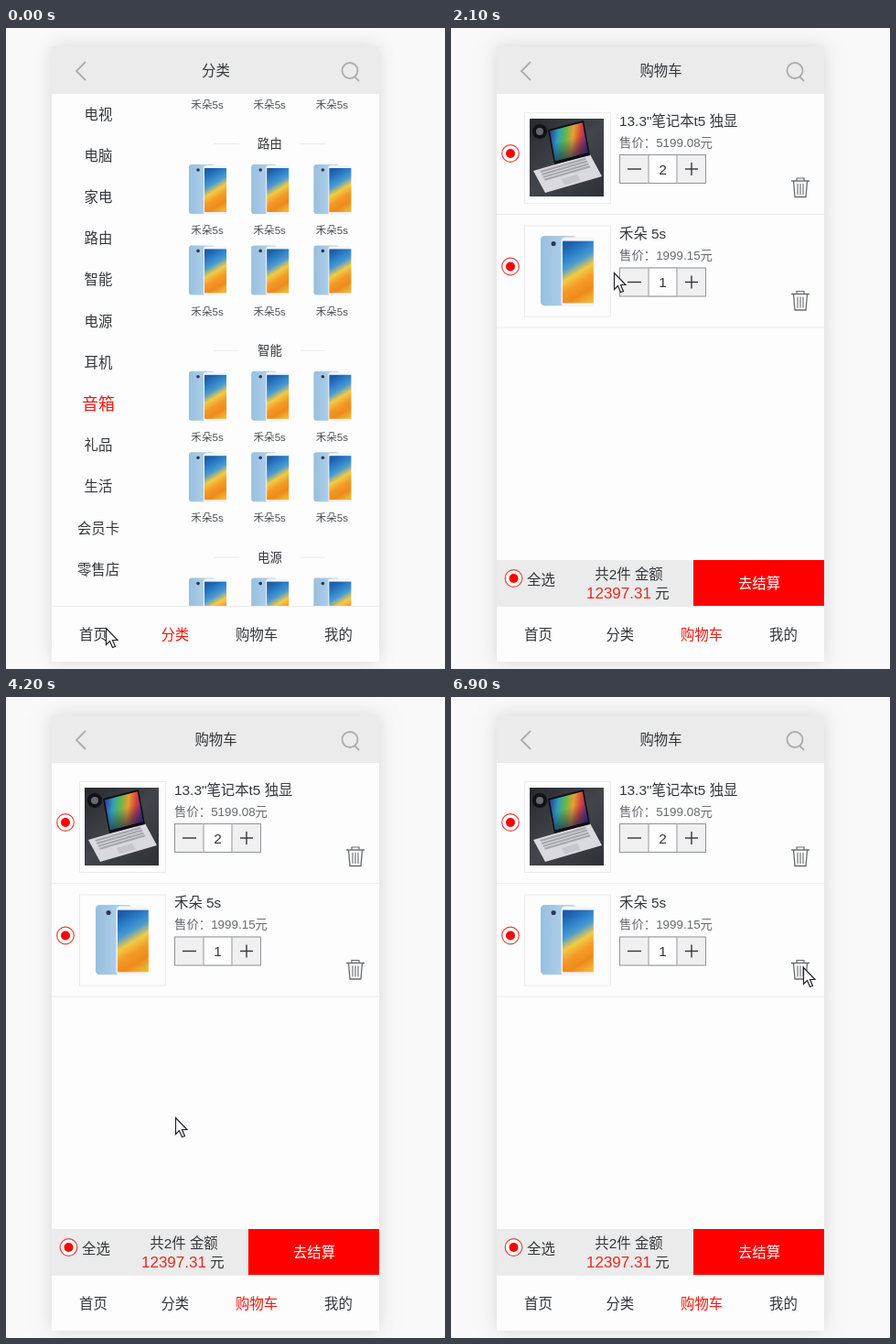
These frames come from a looping animation (480x700 px, 7000 ms). An HTML page with a canvas:

```html
<!DOCTYPE html>
<html lang="zh-CN">
<head>
<meta charset="utf-8">
<style>
html, body { margin: 0; height: 100%; overflow: hidden; }
canvas { display: block; }
</style>
</head>
<body>
<canvas id="stage" width="480" height="700"></canvas>
<script>
const c = document.getElementById('stage').getContext('2d');
const LOOP = 7000, STEP = 100, CART_OPENS = 1100;
const INK = '#33363c', GRAY = '#666a70', RED = '#f01810', BAR = '#ebebeb', PALE = '#ececec', PAPER = '#fdfdfd';
const LEFT = 50, RIGHT = 408, WIDTH = RIGHT - LEFT;
const PRODUCT = '禾朵';
const ARROW = new Path2D('M0 0V18L4 14L7 21L10 20L7 13H12.5Z');

// Places the pointer comes to: time, x, y
const STOPS = [
  [0, 109, 655], [1000, 278, 664], [1300, 278, 664], [2100, 178, 267],
  [3100, 71, 605], [4900, 243, 385], [6100, 385, 295], [LOOP, 385, 295]
];

function rect(x, y, w, h, fill, stroke) {
  c.fillStyle = fill;
  c.fillRect(x, y, w, h);
  if (stroke) {
    c.strokeStyle = stroke;
    c.lineWidth = 1;
    c.strokeRect(x + 0.5, y + 0.5, w - 1, h - 1);
  }
}

function card(x, y, w, h, fill) {
  c.beginPath();
  c.roundRect(x, y, w, h, 3);
  c.fillStyle = fill;
  c.fill();
}

function line(color, width, ...points) {
  c.beginPath();
  points.forEach(([x, y]) => c.lineTo(x, y));
  c.strokeStyle = color;
  c.lineWidth = width;
  c.stroke();
}

const rule = (x1, x2, y, color = PALE, width = 1) => line(color, width, [x1, y], [x2, y]);

function circle(x, y, r, fill, stroke, width = 1) {
  c.beginPath();
  c.arc(x, y, r, 0, Math.PI * 2);
  if (fill) { c.fillStyle = fill; c.fill(); }
  if (stroke) { c.strokeStyle = stroke; c.lineWidth = width; c.stroke(); }
}

function text(str, x, y, size = 15.4, color = INK, align = 'center') {
  c.font = `${size}px "Liberation Sans", "Noto Sans CJK SC", "Noto Sans CJK", sans-serif`;
  c.textAlign = align;
  c.fillStyle = color;
  c.fillText(str, x, y + size * 0.37);
}

function gradient(x1, y1, x2, y2, ...colors) {
  const g = c.createLinearGradient(x1, y1, x2, y2);
  colors.forEach((color, i) => g.addColorStop(i / (colors.length - 1), color));
  return g;
}

// Runs paint with its own coordinates; the matrix goes to c.transform
function within(matrix, paint) {
  c.save();
  c.transform(...matrix);
  paint();
  c.restore();
}

function phone(x, y, scale = 1) {
  within([scale, 0, 0, scale, x, y], () => {
    card(0, 0, 28, 54, gradient(0, 0, 28, 0, '#98bfdf', '#b9d7ee'));
    circle(10, 6, 1.8, '#2c3850');
    card(16, 1, 25.5, 54, '#f3f5f8');
    rect(17, 4, 24, 48, gradient(18, 8, 42, 48,
      '#1c5ca8', '#2a7cc6', '#4a9bd0', '#f2cb45', '#f39a26', '#ee8a1c', '#f0b535'));
  });
}

function laptop() {
  rect(86, 99, 81, 85, gradient(86, 99, 167, 184, '#26282c', '#42454b', '#2d3035'));
  circle(97, 113, 8, '#101216');
  circle(97, 113, 4, '#666a72');
  within([62, -18, 13, 24, 90, 156], () => {
    rect(0, 0, 1, 1, '#d9d9de');
    for (let row = 0; row < 4; row++) rect(0.1, 0.08 + row * 0.12, 0.8, 0.08, '#a6a7ae');
    rect(0.36, 0.64, 0.28, 0.28, '#c6c6cd');
  });
  within([39, -10, 7, 38, 106, 111], () => {
    rect(0, 0, 1, 1, '#0d0f14');
    rect(0.04, 0.05, 0.92, 0.86, gradient(0, 0.3, 1, 0.6, '#2c44a4', '#2f9fb6', '#63b84c', '#e6a032', '#d9413c', '#5a2f94'));
    rect(0.04, 0.05, 0.92, 0.86, gradient(0, 0.4, 0, 1, '#10205000', '#102050c0'));
  });
}

function radio(x, y) {
  circle(x, y, 9.3, PAPER, '#e8443a', 1.2);
  circle(x, y, 5, '#fb0000');
}

function trash(x, y) {
  rule(x - 10, x + 10, y + 4, GRAY, 1.4);
  line(GRAY, 1.2, [x - 4, y + 4], [x - 4, y + 1], [x + 4, y + 1], [x + 4, y + 4]);
  line(GRAY, 1.3, [x - 7.5, y + 4], [x - 6, y + 21.5], [x + 6, y + 21.5], [x + 7.5, y + 4]);
  for (let dx = -3; dx <= 3; dx += 3) line(GRAY, 1.1, [x + dx, y + 7], [x + dx, y + 19]);
}

function category() {
  const menu = '电视 电脑 家电 路由 智能 电源 耳机 音箱 礼品 生活 会员卡 零售店'.split(' ');
  menu.forEach((name, i) => {
    const active = name === '音箱';
    text(name, 101, 94 + i * 45.2, active ? 18 : 15.4, active ? RED : INK);
  });

  // The list is scrolled so that the first section has nearly left the view
  c.save();
  c.beginPath();
  c.rect(LEFT, 72, WIDTH, 559);
  c.clip();
  menu.slice(2, 6).forEach((name, section) => {
    const y = 126 + (section - 1) * 225.8;
    rule(227, 255, y + 0.5);
    rule(322, 349, y + 0.5);
    text(name, 288.5, y, 13.4);
    for (let cell = 0; cell < 6; cell++) {
      const x = 200 + cell % 3 * 68.2, top = y + 23 + Math.floor(cell / 3) * 88.4;
      phone(x, top);
      text(PRODUCT + '5s', x + 20, top + 72, 11.6, '#4c4f55');
    }
  });
  c.restore();
}

function cartRow(y, title, price, count, picture) {
  radio(65, y + 65);
  rect(80, y + 20, 95, 100, PAPER, PALE);
  picture();
  text(title, 184, y + 29, 15.4, INK, 'left');
  text(`售价：${price}元`, 184, y + 53, 13.4, GRAY, 'left');

  rect(184, y + 66, 95, 32, '#f0f0f0', '#90939a');
  rect(215.5, y + 66, 32, 32, PAPER, '#90939a');
  rule(193, 208, y + 82, INK, 1.4);
  rule(256, 270, y + 82, INK, 1.4);
  line(INK, 1.4, [263, y + 75], [263, y + 89]);
  text(count, 231.5, y + 82);
  trash(382, y + 91);
  rule(LEFT, RIGHT, y + 131.5);
}

function cart() {
  cartRow(72, '13.3"笔记本t5 独显', '5199.08', 2, laptop);
  cartRow(195.5, PRODUCT + ' 5s', '1999.15', 1, () => phone(98, 227, 1.41));
  rect(LEFT, 581, 215, 50, BAR);
  rect(265, 581, 143, 50, '#fe0000');
  radio(68.5, 601);
  text('全选', 98.5, 602);
  text('共2件 金额', 194.5, 596);
  text('12397.31', 148, 617, 17, '#e52b24', 'left');
  text('元', 231, 617);
  text('去结算', 337, 606, 15.4, '#fff');
}

function frame(title) {
  rect(0, 0, 480, 700, '#f9f9f9');
  c.save();
  c.shadowColor = '#0002';
  c.shadowBlur = 18;
  rect(LEFT, 20, WIDTH, 672, PAPER);
  c.restore();
  rect(LEFT, 20, WIDTH, 52, BAR);
  line('#adadad', 1.8, [87, 37], [77, 47], [87, 57]);
  circle(376, 46.5, 8.5, null, '#adadad', 1.8);
  line('#adadad', 1.8, [381, 53], [386, 58]);
  text(title, 229.5, 46);
}

function tabs(active) {
  rule(LEFT, RIGHT, 631.5);
  ['首页', '分类', '购物车', '我的'].forEach((name, i) =>
    text(name, 95.5 + i * 89.3, 662, 15.4, name === active ? RED : INK));
}

function pointer(t) {
  const next = STOPS.findIndex(stop => stop[0] > t);
  const [t1, x1, y1] = STOPS[next - 1], [t2, x2, y2] = STOPS[next];
  const k = (t - t1) / (t2 - t1), eased = k * k * (3 - 2 * k);
  const at = (a, b) => Math.round(a + (b - a) * eased) + 0.5;
  within([1, 0, 0, 1, at(x1, x2), at(y1, y2)], () => {
    c.fillStyle = '#fff';
    c.fill(ARROW);
    c.strokeStyle = '#22242c';
    c.lineWidth = 1.2;
    c.stroke(ARROW);
  });
}

function draw(now) {
  const t = Math.floor(now % LOOP / STEP) * STEP;
  const inCart = t >= CART_OPENS;
  const title = inCart ? '购物车' : '分类';
  frame(title);
  inCart ? cart() : category();
  tabs(title);
  pointer(t);
  requestAnimationFrame(draw);
}
draw(0);
</script>
</body>
</html>
```
